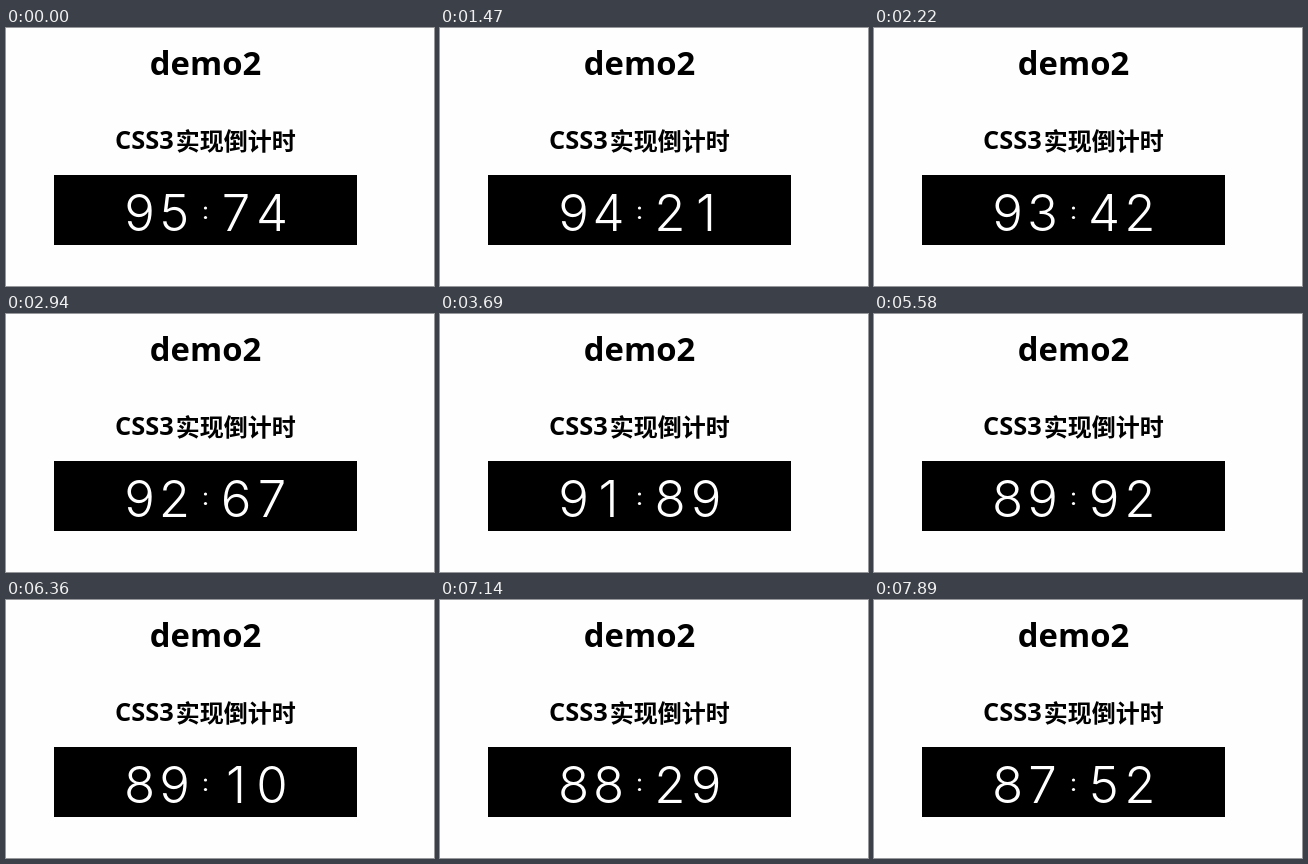
These frames come from a looping animation (428 by 258 pixels, 7920 ms). An HTML page:

```html
<!DOCTYPE html>
<html lang="zh">
<head>
<meta charset="utf-8">
<title>demo2</title>
<style>
html, body { margin: 0; width: 100%; height: 100%; overflow: hidden; background: #fefefe; }
svg { display: block; }
.title { font: bold 32.8px "Noto Sans", "Open Sans", sans-serif; }
.sub { font: bold 25.4px "Noto Sans", "Open Sans", sans-serif; }
.han { font: bold 24px "Noto Sans CJK SC", "Noto Sans CJK", sans-serif; }
.clock { font: 350 51px Inter, "Liberation Sans", sans-serif; fill: #fff; text-anchor: middle; }
</style>
</head>
<body>
<svg width="428" height="258" viewBox="0 0 428 258">
  <text class="title" x="199.5" y="47" text-anchor="middle">demo2</text>
  <text class="sub" x="109" y="121">CSS3</text>
  <text class="han" x="169.7" y="121.5">实现倒计时</text>
  <rect x="48" y="147" width="303" height="70"/>
  <g class="clock">
    <text id="sec" x="133.5 168.5" y="203"></text>
    <text id="cent" x="230 266" y="203"></text>
  </g>
  <g fill="#fff">
    <circle cx="199.5" cy="180" r="1.6"/>
    <circle cx="199.5" cy="189.5" r="1.6"/>
  </g>
</svg>
<script>
const LOOP = 7920, TICK = 30;
// [tick, hundredths left]: the clock drifts slightly against the ticks
const keys = [[0, 9574], [49, 9421], [98, 9267], [148, 9110], [186, 8992], [212, 8910], [263, 8752]];
const sec = document.getElementById('sec'), cent = document.getElementById('cent');

function remaining(tick) {
  const i = Math.max(1, keys.findIndex(k => k[0] >= tick));
  const [t0, v0] = keys[i - 1], [t1, v1] = keys[i];
  return Math.round(v0 + (v1 - v0) * (tick - t0) / (t1 - t0));
}

function draw() {
  const tick = Math.floor(performance.now() % LOOP / TICK);
  const digits = String(remaining(tick)).padStart(4, '0');
  sec.textContent = digits.slice(0, 2);
  cent.textContent = digits.slice(2);
  requestAnimationFrame(draw);
}
draw();
</script>
</body>
</html>
```
